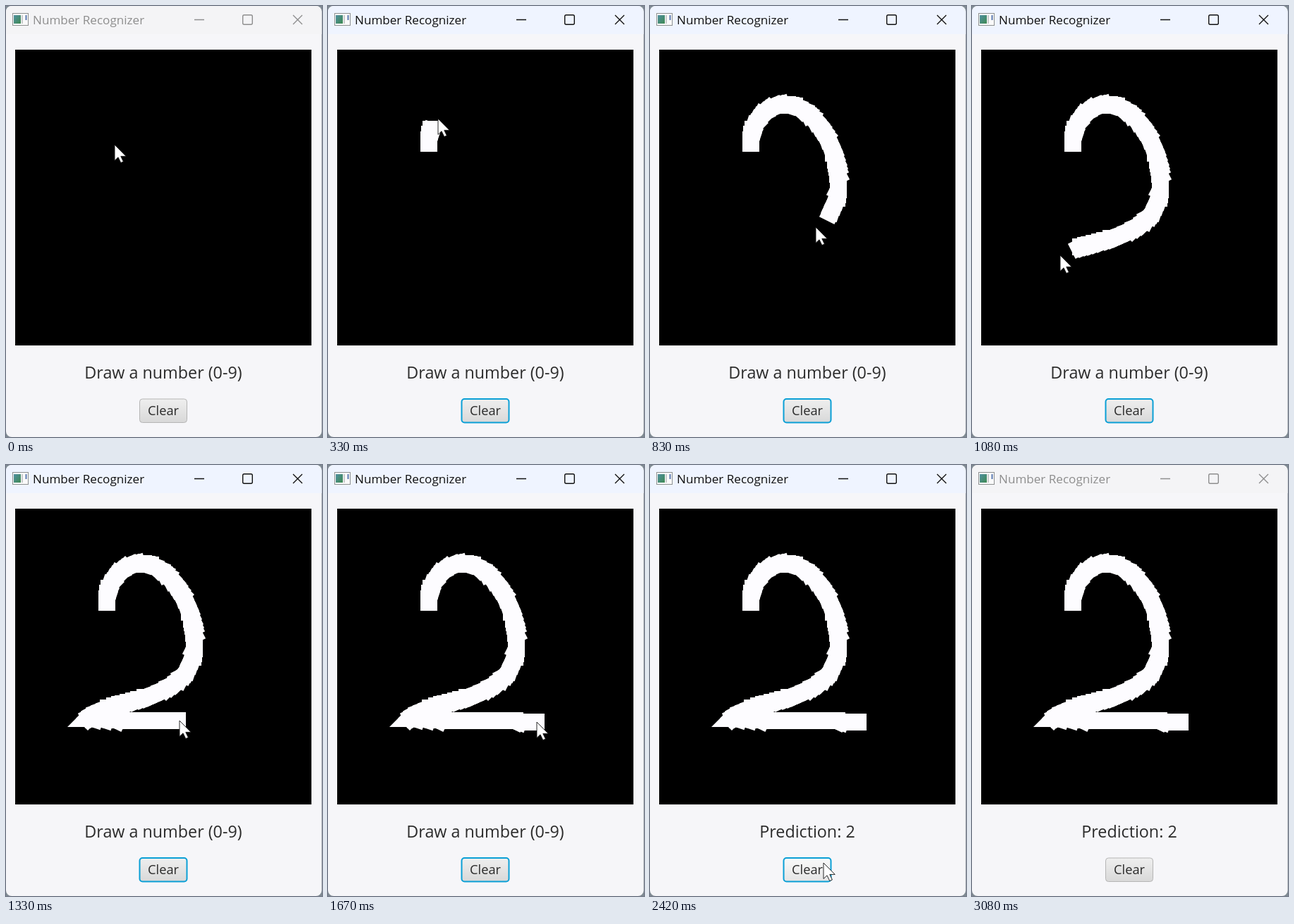
An HTML page with a canvas that plays this animation: 448x612 px, repeating every 3.16 s.

```html
<!DOCTYPE html>
<html lang="en">
<head>
<meta charset="utf-8">
<title>Number Recognizer</title>
<style>
  html, body { margin: 0; width: 100%; height: 100%; overflow: hidden; background: #7f8a92; }
  svg, canvas { position: absolute; left: 0; top: 0; }
  #pad { left: 13px; top: 62px; background: #000; }
  text { font-family: "Open Sans", "Noto Sans", sans-serif; fill: #2b2b2b; }
  #win { --bar: #eff4ff; --ink: #111; --ring: #0a9fd6; --ringWidth: 2; }
  #win.idle { --bar: #f4f4f6; --ink: #8e8e8e; --ring: #b5b5b5; --ringWidth: 1; }
  #bar { fill: var(--bar); }
  #title { fill: var(--ink); }
  #controls { fill: none; stroke: var(--ink); stroke-width: 1.4; }
  #button { stroke: var(--ring); stroke-width: var(--ringWidth); }
</style>
</head>
<body>
<svg id="win" width="448" height="612">
  <defs>
    <linearGradient id="face" x2="0" y2="1">
      <stop offset="0" stop-color="#efefef"/><stop offset="1" stop-color="#d8d8d8"/>
    </linearGradient>
    <linearGradient id="faceHover" x2="0" y2="1">
      <stop offset="0" stop-color="#fafafa"/><stop offset="1" stop-color="#e4e4e4"/>
    </linearGradient>
    <linearGradient id="glass" x2="1" y2="1">
      <stop offset="0" stop-color="#4f8fa0"/><stop offset="1" stop-color="#3f8a52"/>
    </linearGradient>
    <clipPath id="frame"><rect width="447.5" height="612" rx="8"/></clipPath>
    <path id="hook" d="M143 207V195C143 168 162 140 192 140C230 141 267 195 267 250C267 290 250 308 212 325C182 338 134 343 116 360"/>
    <path id="foot" d="M116 360L165 363H266L270 365H297"/>
  </defs>
  <g clip-path="url(#frame)">
    <rect width="448" height="612" fill="#f6f6f9"/>
    <rect id="bar" width="448" height="40"/>
  </g>
  <rect x="9.5" y="10.5" width="22" height="17" fill="#fafafa" stroke="#8d9090"/>
  <rect x="11" y="13" width="10" height="12" fill="url(#glass)"/>
  <path d="M23 13v12" stroke="#c9cccc" stroke-width="2"/>
  <path d="M28.5 13v7" stroke="#5a78b0" stroke-width="2"/>
  <text id="title" x="38" y="26" font-size="17.1">Number Recognizer</text>
  <g id="controls">
    <path d="M267 19.5h14M407 13l13 13m0-13l-13 13"/>
    <rect x="335.7" y="12.7" width="13.6" height="13.6" rx="2"/>
  </g>
  <text id="label" x="223" y="529" font-size="23.3" text-anchor="middle"></text>
  <rect id="button" x="189.5" y="558" width="67" height="33.5" rx="4"/>
  <text x="223" y="581" font-size="18.3" text-anchor="middle">Clear</text>
</svg>
<canvas id="pad" width="420" height="420"></canvas>
<svg id="cursor" width="24" height="32" overflow="visible">
  <path d="M0 0V22.5L5 17.8L8.8 25.6L12.4 24L8.8 16.4H16.2Z" fill="#fff" stroke="#111" stroke-width=".9"/>
</svg>
<script>
const LOOP = 3160, STEP = 1000 / 12, SPACING = 2.5, BRUSH = 24, LEAD = 0.8;
const $ = id => document.getElementById(id);
const ctx = $('pad').getContext('2d');
ctx.translate(-13, -62);
ctx.strokeStyle = '#fdfcff';
ctx.lineWidth = BRUSH;

// Pen positions on whole pixels, which give the stroke its ragged edge
function sample(path) {
  const length = path.getTotalLength(), count = Math.round(length / SPACING);
  return Array.from({ length: count + 1 }, (_, i) => {
    const p = path.getPointAtLength(length * i / count);
    return [Math.round(p.x), Math.round(p.y)];
  });
}
const points = [...sample($('hook')), ...sample($('foot')).slice(1)];

// Pen pace: [step, length drawn]
const start = BRUSH / 2, corner = $('hook').getTotalLength();
const end = corner + $('foot').getTotalLength();
const pace = [[3, start], [6, 77], [7, 110], [10, 284], [14, corner], [16, corner + 128], [17, corner + 131], [20, end]];

const mix = (a, b, f) => a + (b - a) * f;
const mixPoint = (p, q, f) => p.map((v, k) => mix(v, q[k], f));

function drawnAt(step) {
  const next = pace.findIndex(([s]) => s > step);
  if (next === 0) return start;
  if (next < 0) return end;
  const [s0, l0] = pace[next - 1], [s1, l1] = pace[next];
  return mix(l0, l1, (step - s0) / (s1 - s0));
}

const indexAt = length => Math.min(points.length - 1, Math.round(length / SPACING));

// Each pen move is stroked on its own, with a square tip
function drawDigit(last) {
  ctx.clearRect(0, 0, 448, 612);
  for (let i = 1; i <= last; i++) {
    const [x, y] = points[i], [px, py] = points[i - 1];
    const reach = start / Math.hypot(x - px, y - py);
    ctx.beginPath();
    if (i > 1) ctx.moveTo(...points[i - 2]);
    ctx.lineTo(px, py);
    ctx.lineTo(x + (x - px) * reach, y + (y - py) * reach);
    ctx.stroke();
  }
}

function cursorAt(step) {
  if (step < 3) return mixPoint([153, 197], [143, 195], step / 3);
  if (step < 22) return points[indexAt(drawnAt(step + LEAD))];
  const left = Math.max(0, 1 - (step - 22) / 7);
  return mixPoint(points.at(-1), [245, 565], 1 - left ** 3);
}

function render(step) {
  const idle = step < 1 || step >= 36;
  $('win').classList.toggle('idle', idle);
  $('label').textContent = step < 21 ? 'Draw a number (0-9)' : 'Prediction: 2';
  $('button').setAttribute('fill', step >= 27 && !idle ? 'url(#faceHover)' : 'url(#face)');
  drawDigit(step < 3 ? 0 : indexAt(drawnAt(step)));
  const [x, y] = cursorAt(step);
  $('cursor').style.transform = `translate(${x + 1}px, ${y}px)`;
  $('cursor').style.display = step >= 36 ? 'none' : '';
}

let shown = -1;
function tick() {
  const step = Math.floor((performance.now() % LOOP + 4) / STEP);
  if (step !== shown) render(shown = step);
  requestAnimationFrame(tick);
}
tick();
</script>
</body>
</html>
```
